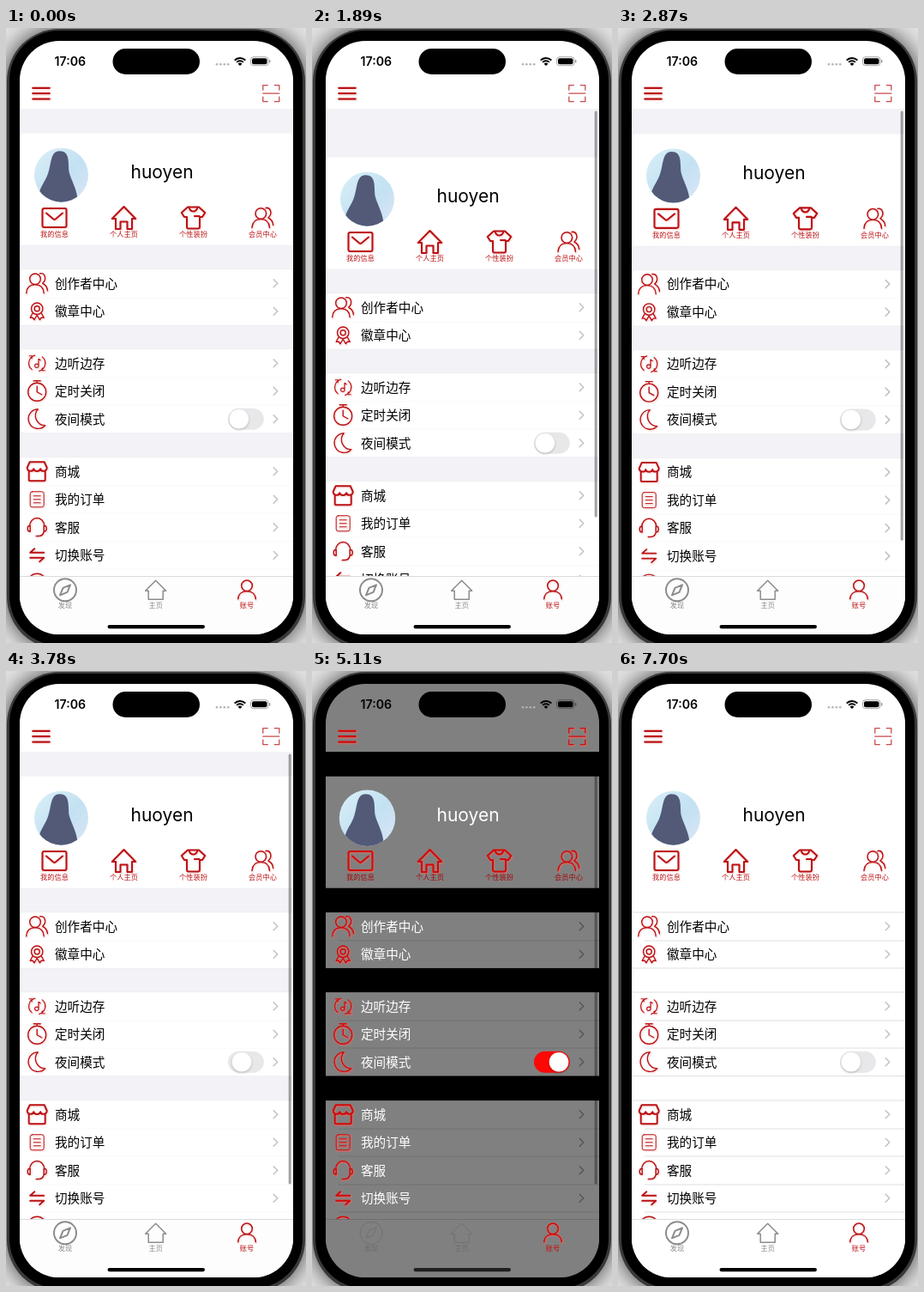
An HTML page with a canvas that plays this animation: 350x716 px, repeating every 8540 ms.

```html
<!DOCTYPE html>
<html lang="zh">
<head>
<meta charset="utf-8">
<title>Account screen</title>
<style>
html, body { margin: 0; width: 100%; height: 100%; overflow: hidden; background: #ddd; }
canvas { display: block; width: 350px; height: 716px; }
</style>
</head>
<body>
<canvas id="stage"></canvas>
<script>
const W = 350, H = 716, LOOP = 8540, STEP = 70;
const canvas = document.getElementById('stage');
const ctx = canvas.getContext('2d');
const dpr = window.devicePixelRatio || 1;
canvas.width = W * dpr;
canvas.height = H * dpr;

const CJK = '"Noto Sans CJK SC", "Noto Sans CJK", sans-serif';
const LATIN = 'Inter, sans-serif';
const TAU = Math.PI * 2;

// Icon outlines, centred on their own origin.
const ICON = {
  mail: 'M-12-11H12Q14-11 14-9V9Q14 11 12 11H-12Q-14 11-14 9V-9Q-14-11-12-11zM-9.5-5.5L-1.5 1.2Q0 2.4 1.5 1.2L9.5-5.5',
  home: 'M0-13L13.7 1H9.5V13H4V4.5H-4V13H-9.5V1H-13.7z',
  shirt: 'M-6.5-12.5H6.5L13.7-6L10.5-1H7.5V10.5Q7.5 12.5 5.5 12.5H-5.5Q-7.5 12.5-7.5 10.5V-1H-10.5L-13.7-6zM-5-12Q-3.5-7.5 0-7.5T5-12M1.5-2H7',
  people: 'M-8.5-5a6.3 6.3 0 1 0 12.6 0a6.3 6.3 0 1 0-12.6 0M-12.5 11.5C-12 4-7 1.5-2.2 1.5S7.5 4 8 11.5M3.5-11.5C9-12.5 12-5 6.5 0C10.5 2 12 5 12.2 8.5',
  medal: 'M-6.7-3a6.7 6.7 0 1 0 13.4 0a6.7 6.7 0 1 0-13.4 0M-3-3a3 3 0 1 0 6 0a3 3 0 1 0-6 0M-5 2L-8 7.5L-5 7.5L-3.2 10L0 4.5L3.2 10L5 7.5L8 7.5L5 2',
  music: 'M-2.5-9.2A9.5 9.5 0 0 0-6 7.4M2.5 9.2A9.5 9.5 0 0 0 6-7.4M-9-8.5H-6V-5.5M9 8.5H6V5.5M-2.6 3a2.2 2.2 0 1 0 4.4 0a2.2 2.2 0 1 0-4.4 0M1.8 3V-5L4-3.5',
  timer: 'M-10.5 1a10.5 10.5 0 1 0 21 0a10.5 10.5 0 1 0-21 0M-4-12H4M0-12V-9.5M0-5.5V1L5.5 4',
  moon: 'M1-11.5A11.3 11.3 0 1 0 9.5 7.5A11.5 11.5 0 0 1 1-11.5z',
  shop: 'M-8.5-11H8.5L11.5-4.5C11.5 .5 4.5 .5 4-3C3.5 .5-3.5 .5-4-3C-4.5 .5-11.5 .5-11.5-4.5zM-9.5 0V9.5Q-9.5 11-8 11H8Q9.5 11 9.5 9.5V0',
  order: 'M-5.5-9H5.5Q8-9 8-6.5V6.5Q8 9 5.5 9H-5.5Q-8 9-8 6.5V-6.5Q-8-9-5.5-9zM-4-4H4M-4 0H4M-4 4H4',
  headset: 'M-8.5-1.5A8.5 9.3 0 0 1 8.5-1.5M-8-2Q-11-2-11 1.5T-8 5zM8-2Q11-2 11 1.5T8 5zM8 5Q7 10.3 1.5 10.3H-1',
  swap: 'M8-3H-8L-3-7.5M-8 3H8L3 7.5',
  ring: 'M-11 0a11 11 0 1 0 22 0a11 11 0 1 0-22 0M-5 0H5',
  compass: 'M-13 0a13 13 0 1 0 26 0a13 13 0 1 0-26 0M6-6L2.5 2.5L-6 6L-2.5-2.5z',
  house: 'M0-11L12 1H8.5V11H-8.5V1H-12z',
  person: 'M-6.3-5a6.3 6.3 0 1 0 12.6 0a6.3 6.3 0 1 0-12.6 0M-10.3 10.5C-10 4.5-5.5 1.5 0 1.5S10 4.5 10.3 10.5',
  menu: 'M-9.7-6.4H9.7M-9.7 0H9.7M-9.7 6.4H9.7',
  scan: 'M-9.5-4V-9.5H-4M4-9.5H9.5V-4M9.5 4V9.5H4M-4 9.5H-9.5V4M-9.5 0H9.5',
  chevron: 'M-2.3-4.5L2.3 0L-2.3 4.5'
};
for (const key in ICON) ICON[key] = new Path2D(ICON[key]);

const SHORTCUTS = [['mail', '我的信息', 56.5], ['home', '个人主页', 137.5],
  ['shirt', '个性装扮', 218.5], ['people', '会员中心', 299.5]];
const ROW = 32.5;
const SECTIONS = [
  [281, [['people', '创作者中心'], ['medal', '徽章中心']]],
  [374, [['music', '边听边存', 1.2], ['timer', '定时关闭'], ['moon', '夜间模式']]],
  [500, [['shop', '商城', 2], ['order', '我的订单', 1], ['headset', '客服', 1.5], ['swap', '切换账号', 1.9], ['ring', '']]]
];

const LIGHT = { cell: '#fff', gap: '#f2f2f7', text: '#000', red: '#bb1215', halo: 'rgba(215,40,40,.10)',
  line: 'rgba(60,60,67,.03)', chevron: '#c2c2c4', tab: '#8c8c8c', bar: '#fdfdfd', rim: '#d4d4d6', home: '#000' };
const PLAIN = { ...LIGHT, gap: '#fff', line: 'rgba(60,60,67,.16)', bar: '#fff' };
const DARK = { cell: '#808080', gap: '#000', text: '#fff', red: '#cd0b0b', halo: 'rgba(255,95,90,.42)',
  line: 'rgba(0,0,0,.13)', chevron: '#555557', tab: '#6c6c6c', bar: '#808080', rim: '#6a6a6a', home: '#202020' };

function rect(x, y, w, h, color) {
  ctx.fillStyle = color;
  ctx.fillRect(x, y, w, h);
}

function pill(x, y, w, h, r, color) {
  ctx.beginPath();
  ctx.roundRect(x, y, w, h, r);
  ctx.fillStyle = color;
  ctx.fill();
}

function dot(x, y, r, color) {
  ctx.beginPath();
  ctx.arc(x, y, r, 0, TAU);
  ctx.fillStyle = color;
  ctx.fill();
}

function label(str, x, y, font, color, align = 'left') {
  ctx.font = font;
  ctx.textAlign = align;
  ctx.fillStyle = color;
  ctx.fillText(str, x, y);
}

function icon(name, x, y, color, width, halo) {
  ctx.save();
  ctx.translate(x, y);
  ctx.lineCap = ctx.lineJoin = 'round';
  if (halo) {
    ctx.save();
    ctx.translate(.7, .8);
    ctx.strokeStyle = halo;
    ctx.lineWidth = width + 2;
    ctx.stroke(ICON[name]);
    ctx.restore();
  }
  ctx.strokeStyle = color;
  ctx.lineWidth = width;
  ctx.stroke(ICON[name]);
  ctx.restore();
}

function pullAt(t) {
  if (t < 1470) return 0;
  if (t <= 2310) return 28 * (1 - Math.cos(Math.PI * (t - 1470) / 840));
  if (t > 3080) return 0;
  const k = .011 * (t - 2310);
  return 56 * (1 + k) * Math.exp(-k);
}

function isDark(t) {
  return (t >= 3850 && t < 4550) || (t >= 4970 && t < 5530) || (t >= 6020 && t < 6510);
}

// Knob travel: 0 is off, 1 is on.
function knobAt(t) {
  if (t < 3780) return 0;
  if (t < 3850) return .2;
  if (t < 3920) return .82;
  for (const off of [4480, 5460, 6440]) {
    if (t >= off && t < off + 70) return .82;
    if (t >= off + 70 && t < off + 140) return .2;
  }
  return isDark(t) ? 1 : 0;
}

function drawPhone() {
  rect(0, 0, W, H, '#e2e2e2');
  ctx.save();
  ctx.shadowColor = 'rgba(0,0,0,.75)';
  ctx.shadowBlur = 26 * dpr;
  pill(1, 1, 348, 722, 61, '#393939');
  ctx.restore();
  pill(4, 3, 342, 716, 58, '#000');
}

function drawAvatar(y, dark) {
  const x = 64.5, r = dark ? 32.7 : 31.5;
  const g = ctx.createLinearGradient(x - r, y - r, x + r, y + r);
  g.addColorStop(0, '#daf0f8');
  g.addColorStop(.55, '#c3e1f2');
  g.addColorStop(1, '#dbe5f6');
  ctx.save();
  ctx.beginPath();
  ctx.arc(x, y, r, 0, TAU);
  ctx.clip();
  rect(x - 34, y - 34, 68, 68, g);
  ctx.translate(x, y);
  ctx.fillStyle = '#525a78';
  ctx.fill(new Path2D('M-2-28C-14-28-11-10-17 2C-21 11-27 16-28 34H19C20 18 12 8 9-4C8-16 10-28-2-28z'));
  ctx.restore();
}

function drawStatus() {
  label('17:06', 56.5, 44, '600 14.2px ' + LATIN, '#000');
  pill(124.5, 24, 101.5, 30, 15, '#000');
  for (let i = 0; i < 4; i++) dot(246 + i * 4.4, 42.3, 1.3, '#b4b4b6');
  ctx.strokeStyle = '#000';
  ctx.lineCap = 'butt';
  ctx.lineWidth = 2;
  for (const r of [8.6, 5.3]) {
    ctx.beginPath();
    ctx.arc(273, 43.5, r, -Math.PI * .76, -Math.PI * .24);
    ctx.stroke();
  }
  ctx.beginPath();
  ctx.moveTo(273, 44);
  ctx.arc(273, 44, 3.3, -Math.PI * .76, -Math.PI * .24);
  ctx.fillStyle = '#000';
  ctx.fill();
  ctx.beginPath();
  ctx.roundRect(285.5, 33.7, 20.5, 10, 3.2);
  ctx.strokeStyle = 'rgba(0,0,0,.35)';
  ctx.lineWidth = 1;
  ctx.stroke();
  pill(287, 35.2, 17.5, 7, 2, '#000');
  pill(307, 37, 1.4, 3.6, .7, 'rgba(0,0,0,.4)');
}

function drawSwitch(y, k, dark) {
  pill(259, y - 12.5, 41.8, 25, 12.5, dark ? '#fb0807' : '#e8e8ea');
  if (dark && k < 1) {
    ctx.strokeStyle = 'rgba(90,50,50,.5)';
    ctx.lineWidth = 1;
    ctx.beginPath();
    ctx.roundRect(259.5, y - 12, 40.8, 24, 12);
    ctx.stroke();
  }
  ctx.save();
  ctx.shadowColor = 'rgba(0,0,0,.22)';
  ctx.shadowBlur = 3 * dpr;
  ctx.shadowOffsetY = 1.2 * dpr;
  dot(271.8 + 16.2 * k, y, 11.3, '#fff');
  ctx.restore();
}

function drawProfile(top, c, dark) {
  rect(16, top, 319, 130, c.cell);
  drawAvatar(top + 48.5, dark);
  label('huoyen', 145.5, top + 52, '400 21px ' + LATIN, c.text);
  for (const [name, text, x] of SHORTCUTS) {
    icon(name, x, top + 98.3, c.red, name === 'people' ? 1.5 : 2.1, c.halo);
    label(text, x, top + 120.5, (dark ? '500' : '400') + ' 8.2px ' + CJK, dark ? '#a60808' : c.red, 'center');
  }
}

function drawSection(top, rows, c, knob, dark) {
  rect(16, top, 319, rows.length * ROW, c.cell);
  rows.forEach(([name, text, width = 1.4], i) => {
    const y = top + ROW * (i + .5);
    rect(i ? 31 : 16, Math.round(top + ROW * i) - .5, i ? 304 : 319, 1, c.line);
    icon(name, 36.2, y, c.red, width, c.halo);
    label(text, 57, y + 5.4, '400 14.6px ' + CJK, c.text);
    icon('chevron', 314.5, y, c.chevron, 1.5);
    if (name === 'moon') drawSwitch(y, knob, dark);
  });
  rect(16, top + rows.length * ROW - .5, 319, 1, c.line);
}

function drawTabs(c, dark) {
  rect(16, 638, 319, 68, c.bar);
  rect(16, 638, 319, .8, c.rim);
  const tabs = [['compass', '发现', 69], ['house', '主页', 174.7], ['person', '账号', 281]];
  tabs.forEach(([name, text, x], i) => {
    const active = i === 2;
    const color = active ? c.red : c.tab;
    const width = dark && !active ? .8 : name === 'compass' ? 2 : 1.5;
    icon(name, x, 654.3, color, width, active ? c.halo : null);
    label(text, x, 675, (active ? '500' : '400') + ' 8.2px ' + CJK, color, 'center');
  });
  pill(118.5, 695, 113.5, 4.2, 2.1, c.home);
}

function drawScrollbar(t, pull) {
  if (t < 1540 || t >= 7700) return;
  const alpha = t < 7560 ? .36 : .36 * (7700 - t) / 210;
  pill(329.7, 96.5, 3, 501 - pull, 1.5, `rgba(0,0,0,${alpha})`);
}

function draw(t) {
  const dark = isDark(t);
  const c = dark ? DARK : t < 4000 ? LIGHT : PLAIN;
  const pull = pullAt(t), knob = knobAt(t);
  ctx.setTransform(dpr, 0, 0, dpr, 0, 0);
  drawPhone();

  ctx.save();
  ctx.beginPath();
  ctx.roundRect(16, 15, 319, 691, 46);
  ctx.clip();
  rect(16, 15, 319, 691, c.cell);

  ctx.save();
  ctx.beginPath();
  ctx.rect(16, 94, 319, 544);
  ctx.clip();
  rect(16, 94, 319, 544, c.gap);
  drawProfile(122.7 + pull, c, dark);
  for (const [top, rows] of SECTIONS) drawSection(top + pull, rows, c, knob, dark);
  drawScrollbar(t, pull);
  ctx.restore();

  drawStatus();
  icon('menu', 41, 76.2, c.red, 2.2, c.halo);
  icon('scan', 309.3, 76.2, dark ? c.red : '#c94a4c', 1.3, dark ? c.halo : null);
  drawTabs(c, dark);
  ctx.restore();
}

const start = performance.now();
function tick() {
  const t = (performance.now() - start) % LOOP;
  draw(Math.floor(t / STEP) * STEP);
  requestAnimationFrame(tick);
}
tick();
</script>
</body>
</html>
```
